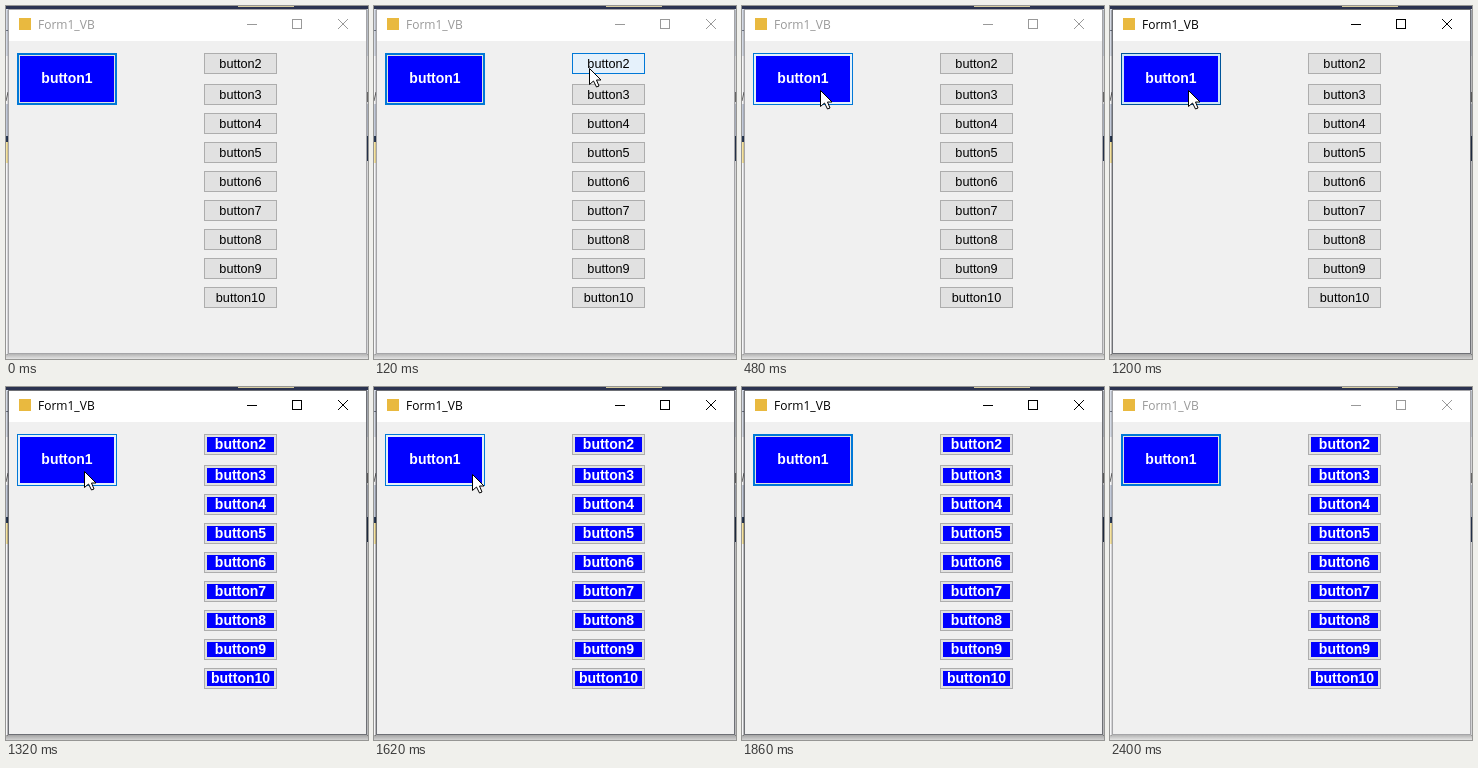
Recreate the animation shown at these times as an HTML page with a canvas. Size 362 by 353 pixels, loop 2520 ms.

```html
<!DOCTYPE html>
<html lang="en">
<head>
<meta charset="utf-8">
<title>Form buttons</title>
<style>
  html, body { margin: 0; width: 100%; height: 100%; overflow: hidden; background: #fff; }
  canvas { display: block; }
</style>
</head>
<body>
<canvas id="stage" width="362" height="353"></canvas>
<script>
const ctx = document.getElementById('stage').getContext('2d');
const LOOP = 2520;
const BLUE = '#0000ff';
const ACCENT = '#0078d7';

// Pointer tip per step: [start ms, x, y]; no coordinates means hidden.
const POINTER = [
  [0], [120, 215, 62], [180, 92, 88], [240, 84, 86], [360, 80, 85], [480, 78, 84],
  [1620, 98, 87], [1680, 188, 89], [1740, 302, 87], [1800]
];

const STYLES = {
  normal:  { border: '#adadad', fill: '#e1e1e1', line: 1 },
  focused: { border: ACCENT, fill: '#e1e1e1', line: 2 },
  hot:     { border: ACCENT, fill: '#e5f1fb', line: 1 },
  pressed: { border: '#005499', fill: '#cce4f7', line: 1 }
};

function rect(color, x, y, w, h) {
  ctx.fillStyle = color;
  ctx.fillRect(x, y, w, h);
}

function label(text, x, y, font, color, align = 'center') {
  ctx.font = font;
  ctx.textAlign = align;
  ctx.fillStyle = color;
  ctx.fillText(text, x, y);
}

function strokePath(color, points) {
  ctx.strokeStyle = color;
  ctx.lineWidth = 1;
  ctx.beginPath();
  points.forEach(([x, y], i) => i ? ctx.lineTo(x, y) : ctx.moveTo(x, y));
  ctx.stroke();
}

function drawBackdrop(active) {
  rect('#f6f6f8', 0, 0, 362, 353);
  rect('#2b3350', 0, 0, 362, 3);
  rect('#d8cda0', 232, 0, 56, 1);
  rect('#d6dbe6', 0, 3, 2, 47);
  rect('#6f7686', 0, 24, 2, 1);
  strokePath('#666', [[0, 95], [2, 86]]);
  rect('#c3cad9', 0, 98, 2, 32);
  rect('#293955', 0, 130, 2, 6);
  rect('#f6e3a0', 0, 136, 2, 21);
  rect('#d6dbe6', 361, 3, 1, 47);
  rect('#777', 361, 86, 1, 10);
  rect('#c3cad9', 361, 98, 1, 32);
  rect('#293955', 361, 130, 1, 25);

  const shade = ctx.createLinearGradient(0, 348, 0, 353);
  shade.addColorStop(0, active ? '#a4a4a4' : '#b4b4b4');
  shade.addColorStop(1, active ? '#d2d2d2' : '#e4e4e4');
  rect(shade, 0, 348, 362, 5);
  rect(active ? 'rgba(0,0,0,.25)' : 'rgba(0,0,0,.14)', 1, 4, 1, 345);
  rect(active ? 'rgba(0,0,0,.25)' : 'rgba(0,0,0,.14)', 361, 4, 1, 345);
}

function drawWindow(active) {
  const ink = active ? '#000' : '#999';
  rect(active ? '#6e7075' : '#a5a5a8', 2, 3, 359, 345);
  rect('#fff', 3, 4, 357, 31);
  rect('#f0f0f0', 3, 35, 357, 312);
  rect('#e9b93f', 13, 12, 12, 12);
  label('Form1_VB', 32, 23, '12px "Open Sans", "Noto Sans", sans-serif', ink, 'left');
  rect(ink, 241, 18, 10, 1);
  ctx.strokeStyle = ink;
  ctx.lineWidth = 1;
  ctx.strokeRect(286.5, 13.5, 9, 9);
  strokePath(ink, [[332, 13], [342, 23]]);
  strokePath(ink, [[342, 13], [332, 23]]);
}

function drawButton(text, x, y, w, h, state, blue) {
  const { border, fill, line } = STYLES[state];
  rect(border, x, y, w, h);
  rect(fill, x + line, y + line, w - 2 * line, h - 2 * line);
  if (blue) rect(BLUE, x + 3, y + 3, w - 6, h - 6);
  const font = (blue ? 'bold 14px' : '12.7px') + ' "Liberation Sans", Arial, sans-serif';
  label(text, x + w / 2, y + Math.round(h / 2) + 4, font, blue ? '#fff' : '#000');
}

function drawPointer(x, y) {
  const outline = [[0, 0], [0, 16], [4, 12.5], [7, 18.5], [9.5, 17.5], [7, 11.5], [11.5, 11.5]];
  ctx.beginPath();
  outline.forEach(([dx, dy]) => ctx.lineTo(x + dx + 0.5, y + dy + 0.5));
  ctx.closePath();
  ctx.fillStyle = '#fff';
  ctx.fill();
  ctx.strokeStyle = '#000';
  ctx.lineWidth = 1;
  ctx.stroke();
}

function mainState(t) {
  if (t < 180 || t >= 1800) return 'focused';
  if (t >= 1200 && t < 1320) return 'pressed';
  return t < 1680 ? 'hot' : 'focused';
}

function render(t) {
  const active = t >= 1200 && t < 2400;
  const painted = t >= 1320;
  drawBackdrop(active);
  drawWindow(active);
  drawButton('button1', 11, 47, 100, 52, mainState(t), true);
  for (let n = 2; n <= 10; n++) {
    const y = n === 2 ? 47 : 78 + (n - 3) * 29;
    const hovered = n === 2 && t >= 120 && t < 180;
    drawButton('button' + n, 198, y, 73, 21, hovered ? 'hot' : 'normal', painted);
  }
  const [, x, y] = POINTER.findLast(step => step[0] <= t);
  if (x !== undefined) drawPointer(x, y);
}

const start = performance.now();
function tick() {
  render((performance.now() - start) % LOOP);
  requestAnimationFrame(tick);
}
tick();
</script>
</body>
</html>
```
